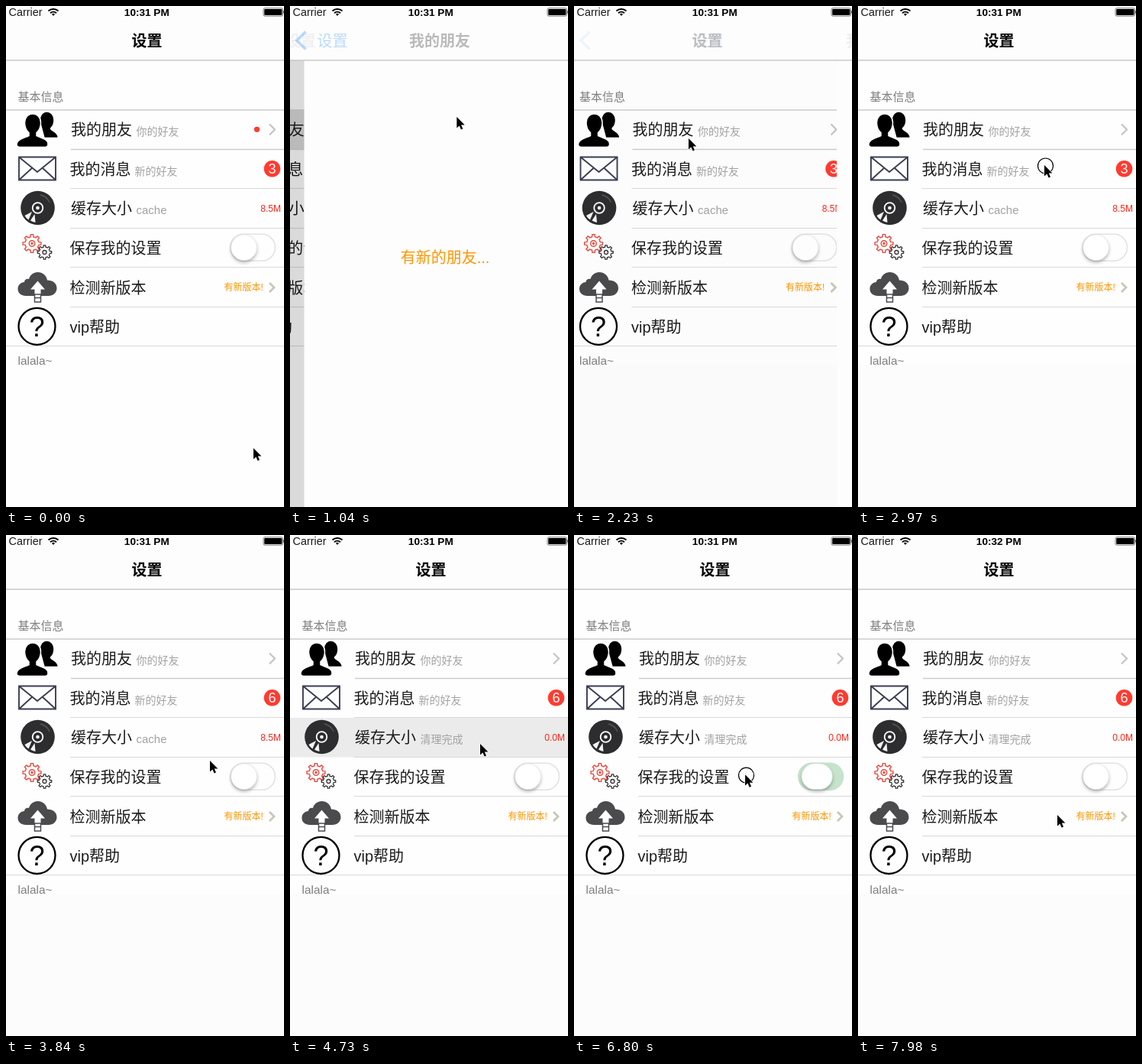
These frames come from a looping animation (364 px wide and 655 px high, 8 s). An HTML page:

```html
<!DOCTYPE html>
<html lang="zh-CN">
<head>
<meta charset="utf-8">
<style>
html, body { margin: 0; width: 100%; height: 100%; overflow: hidden; background: #fefefe; }
svg { display: block; width: 364px; height: 655px; }
text { font: 20px "Liberation Sans", "Noto Sans CJK SC", "Noto Sans CJK", sans-serif; fill: #1a1a1a; }
.title { font-weight: bold; text-anchor: middle; fill: #000; }
.sub { font-size: 14px; fill: #a2a2a2; }
.note { font-size: 15px; fill: #7e7e7e; }
.small { font-size: 12px; }
.line { fill: none; }
</style>
</head>
<body>
<svg viewBox="0 0 364 655">
  <defs>
    <filter id="soft" x="-40%" y="-40%" width="180%" height="190%">
      <feDropShadow dx="0" dy="2.5" stdDeviation="2" flood-opacity=".3"/>
    </filter>
  </defs>

  <g id="list">
    <rect width="364" height="655" fill="#fefefe"/>
    <rect id="foot" y="469" width="364" height="186" fill="#fcfcfc"/>
    <text class="note" x="15.500" y="124">基本信息</text>
    <text class="note" x="15.500" y="468.500" style="font-size:15.400px">lalala~</text>
    <g id="lines"></g>
    <rect class="hl" y="136" width="364" height="51.500" fill="#d9d9d9"/>
    <rect class="hl" y="187" width="364" height="51.500" fill="#d9d9d9"/>
    <rect class="hl" y="239" width="364" height="51.500" fill="#d9d9d9"/>

    <!-- friends -->
    <g stroke="#fff" stroke-width="1.500">
      <path d="M44 150c0-7 4-12 9.500-12s9.500 5 9.500 11c0 5-2 9-4.500 11 0 3 10 4 10 12.500H50z"/>
      <path d="M35 141c6 0 10.500 5 10.500 11.500 0 6-2.500 10.500-5.500 13v4c4 2.500 15 4 15 11 0 3-1 4-4 4H18c-3 0-4-1-4-4 0-7 12-8.500 16-11v-4c-3-2.500-5.500-7-5.500-13C24.500 146 29 141 35 141z"/>
    </g>
    <text x="85" y="169">我的朋友</text>
    <text class="sub" x="170.500" y="169.300">你的好友</text>
    <circle id="dot" cx="328.500" cy="161.300" r="3.600" fill="#ff3b30"/>
    <path class="line" d="M345 154.500l7 7-7 7" stroke="#c4c4c8" stroke-width="2.200"/>

    <!-- messages -->
    <path class="line" d="M17 197.500h48v30h-48zl24 19.500 24-19.500M17 227.500l17.500-16M65 227.500l-17.500-16" stroke="#3b3e52" stroke-width="1.900"/>
    <text x="83.500" y="220.500">我的消息</text>
    <text class="sub" x="168.500" y="221">新的好友</text>
    <circle cx="348.500" cy="212.800" r="10.800" fill="#ff3b30"/>
    <text id="badge" x="348.500" y="219" text-anchor="middle" style="font-size:18px;fill:#fff"></text>

    <!-- cache -->
    <circle cx="41.500" cy="264" r="22.300" fill="#2d2d2f"/>
    <circle class="line" cx="41.500" cy="264" r="6.800" stroke="#fff" stroke-width="1.800"/>
    <circle cx="41.500" cy="264" r="2.300" fill="#fff"/>
    <path d="M34 269l-9.500 5c1.500 2.500 3 4 5 5.500zM37.500 272l-5.500 8.500c2 1.200 4 2 6.500 2.500z" fill="#f4f4f4"/>
    <path class="line" d="M45 247a17 17 0 0 1 12 10" stroke="#555" stroke-width="1.500"/>
    <text x="85" y="272">缓存大小</text>
    <text class="sub" id="state" x="170.500" y="272.300"></text>
    <text class="small" id="size" x="360" y="269" text-anchor="end" style="fill:#ff2419"></text>

    <!-- preferences -->
    <g class="line" stroke="#e8473c" stroke-width="1.400">
      <path id="gearA"/><circle cx="34" cy="310.500" r="3.800"/><circle cx="34" cy="310.500" r="1"/>
    </g>
    <g class="line" stroke="#333" stroke-width="1.300">
      <path id="gearB"/><circle cx="50.500" cy="322" r="2.500"/>
    </g>
    <text x="83.500" y="324">保存我的设置</text>
    <rect id="track" x="293.800" y="298.300" width="58.700" height="35" rx="17.500" stroke-width="1.600"/>
    <rect id="thumb" y="299" height="33.500" rx="16.750" fill="#fff" stroke="#ddd" stroke-width=".6" filter="url(#soft)"/>

    <!-- version -->
    <path d="M26 379c-6 0-10.500-3.500-10.500-9s4-8.500 8.500-9c0-3 3-5 6-4 1.500-5.500 6-9 11.500-9 6.500 0 11.500 4.500 12.500 10.500 7 0 12.500 4 12.500 10.500 0 6-5 10-11 10z" fill="#4b4b4e"/>
    <path d="M41.500 359.500l9.500 11h-5.500V387h-8v-16.500H32z" fill="#fff"/>
    <path class="line" d="M37.500 377v10h8v-10zM37.500 381.500h8" stroke="#4b4b4e" stroke-width="1.500"/>
    <text x="83.500" y="375.500">检测新版本</text>
    <text class="small" x="285.500" y="372" style="fill:#ff9500">有新版本!</text>
    <path class="line" d="M345 362l6 6-6 6" stroke="#c6c8b8" stroke-width="2.800"/>

    <!-- help -->
    <circle cx="40.500" cy="418.800" r="24" fill="#fff" stroke="#000" stroke-width="2.300"/>
    <text x="40.500" y="431.500" text-anchor="middle" style="font-size:36px;fill:#000">?</text>
    <text x="83.500" y="427">vip帮助</text>

    <rect id="dim" width="364" height="655"/>
  </g>

  <g id="page">
    <rect width="364" height="655" fill="#fdfdfd"/>
    <text x="184.500" y="336" text-anchor="middle" style="fill:#ff9500">有新的朋友...</text>
  </g>

  <rect width="364" height="71" fill="#fdfdfd"/>
  <rect y="70.300" width="364" height="1.400" fill="#c6c6c6"/>
  <text class="title" id="listTitle" y="52.500">设置</text>
  <text class="title" id="pageTitle" y="52.500">我的朋友</text>
  <g id="back">
    <path class="line" d="M20.500 33.500L9 45l11.500 11.500" stroke="#007aff" stroke-width="3.800"/>
    <text id="backLabel" y="52.500" style="fill:#007aff">设置</text>
  </g>

  <text x="3.500" y="13" style="font-size:14.400px">Carrier</text>
  <g class="line" stroke="#000" stroke-width="2">
    <path d="M55.500 6.500a9.500 9.500 0 0 1 13 0M58 9.300a6 6 0 0 1 8 0"/>
    <path d="M62 13l-2-2.300a3 3 0 0 1 4 0z" fill="#000" stroke="none"/>
  </g>
  <text class="title" id="clock" x="184.300" y="13" style="font-size:13.600px"></text>
  <rect x="337" y="2.800" width="25.500" height="10.400" rx="2" fill="#fff" stroke="#555" stroke-width=".8"/>
  <rect x="338.200" y="4" width="23.200" height="8" rx="1"/>
  <path d="M363.300 6.500v3" stroke="#555"/>

  <g id="cursor">
    <circle id="ring" class="line" cx="1.500" cy="1" r="10" stroke="#000" stroke-width="1.200"/>
    <path d="M0 0V14.500L3.400 11.400 5.600 16.500 8 15.500 5.800 10.500H10.400Z" stroke="#fff" stroke-width="1.300" paint-order="stroke"/>
  </g>
</svg>
<script>
const LOOP = 8000, STEP = 147.8, W = 364;
const $ = id => document.getElementById(id);
const set = (id, attrs) => { for (const k in attrs) $(id).setAttribute(k, attrs[k]); };
const clamp = v => Math.max(0, Math.min(1, v));
const ramp = (t, start, length) => clamp((t - start) / length);
const easeOut = u => 1 - (1 - u) ** 3;
const during = (t, a, b) => t >= a && t < b;

function gear(cx, cy, outer, inner, teeth) {
  const pts = [];
  for (let i = 0; i < teeth; i++) {
    [[-.27, inner], [-.17, outer], [.17, outer], [.27, inner]].forEach(([o, r]) => {
      const a = (i + o) * 2 * Math.PI / teeth;
      pts.push((cx + r * Math.cos(a)).toFixed(1) + ' ' + (cy + r * Math.sin(a)).toFixed(1));
    });
  }
  return 'M' + pts.join('L') + 'Z';
}
set('gearA', { d: gear(34, 310.5, 12, 9, 8) });
set('gearB', { d: gear(50.5, 322, 9.3, 7, 8) });

$('lines').innerHTML = [135.3, 186.8, 238.3, 289.8, 341.3, 392.8, 444.3].map((y, i) => {
  const x = i % 6 ? (i === 1 ? 85 : 84) : 0, strong = i < 2;
  return `<rect x="${x}" y="${strong ? y : Math.round(y)}" width="${W - x}" height="${strong ? 1.4 : 1}" fill="${strong ? '#cacaca' : '#d9d9d9'}"/>`;
}).join('');
const highlights = document.querySelectorAll('.hl');

// time, x, y of the pointer tip
const path = [
  [0, 324, 578], [560, 250, 168], [850, 250, 168], [1478, 98, 58], [1750, 42, 46],
  [1900, 42, 46], [2217, 150, 173], [2700, 244, 208], [3500, 244, 208], [3843, 267, 295],
  [4250, 249, 273], [5100, 249, 273], [5500, 312, 314], [5680, 314, 314], [5912, 380, 316],
  [6207, 340, 316], [6900, 217, 313], [7390, 222, 317], [7830, 256, 371], [7981, 261, 366]
];
const clicks = [620, 1800, 2900, 3200, 3480, 4480];
const messageTaps = clicks.slice(2, 5);

function pointer(t) {
  let i = 1;
  while (i < path.length - 1 && t > path[i][0]) i++;
  const [t0, x0, y0] = path[i - 1], [t1, x1, y1] = path[i];
  const u = ramp(t, t0, t1 - t0), e = u * u * (3 - 2 * u);
  return [x0 + (x1 - x0) * e, y0 + (y1 - y0) * e];
}

function drawNavigation(t) {
  const push = ramp(t, 720, 500), pop = ramp(t, 1907, 500);
  const q = easeOut(push) - easeOut(pop);
  const late = u => clamp((u - .5) * 2), early = u => clamp(1 - u / .66);
  const listAlpha = pop ? late(pop) : early(push);
  const pageAlpha = pop ? early(pop) : late(push);
  set('list', { transform: `translate(${-154 * q})` });
  set('page', { transform: `translate(${W * (1 - q)})` });
  set('dim', { opacity: .15 * q });
  set('listTitle', { x: 184.5 - 180 * q, opacity: listAlpha });
  set('pageTitle', { x: 184.5 + 224 * (1 - q), opacity: pageAlpha });
  set('back', { opacity: pageAlpha });
  set('backLabel', { x: 28.5 + 136 * (1 - q) });
  set('foot', { opacity: t > 2200 ? 1 : 0 });
  set('dot', { opacity: t < 1200 ? 1 : 0 });
}

function drawRows(t) {
  const flash = start => t < start ? 0 : 1 - ramp(t, start + 80, 200);
  highlights[0].style.opacity = during(t, 580, 1250) ? 1 : 0;
  highlights[1].style.opacity = Math.max(...messageTaps.map(s => flash(s + 70)));
  highlights[2].style.opacity = flash(4550);
  $('badge').textContent = 3 + messageTaps.filter(s => t > s + 70).length;
  const cleared = t > 4700;
  $('state').textContent = cleared ? '清理完成' : 'cache';
  $('state').style.fontSize = cleared ? '14px' : '15px';
  $('size').textContent = cleared ? '0.0M' : '8.5M';
}

function drawSwitch(t) {
  const on = ramp(t, 5816, 300) - ramp(t, 6560, 300);
  const press = ramp(t, 5600, 150) - ramp(t, 7050, 200);
  const mix = (off, held, lit) => {
    const base = off + (held - off) * press;
    return Math.round(base + (lit - base) * on);
  };
  const rgb = off => `rgb(${mix(off, 229, 76)},${mix(off, 229, 217)},${mix(off, 229, 100)})`;
  set('track', { fill: rgb(254), stroke: rgb(227) });
  const width = 33.5 + 6.5 * press;
  set('thumb', { x: 294.8 + on * (56.7 - width), width });
}

function draw(now) {
  // the picture advances in even steps
  const t = Math.floor((now % LOOP + 5) / STEP) * STEP;
  drawNavigation(t);
  drawRows(t);
  drawSwitch(t);
  $('clock').textContent = t < 7700 ? '10:31 PM' : '10:32 PM';
  const [x, y] = pointer(t);
  set('cursor', { transform: `translate(${x} ${y})` });
  const held = clicks.some(c => during(t, c, c + 140)) || during(t, 5600, 7050);
  set('ring', { opacity: held ? 1 : 0 });
}

let start;
function tick(now) {
  start ??= now;
  draw(now - start);
  requestAnimationFrame(tick);
}
draw(0);
requestAnimationFrame(tick);
</script>
</body>
</html>
```
